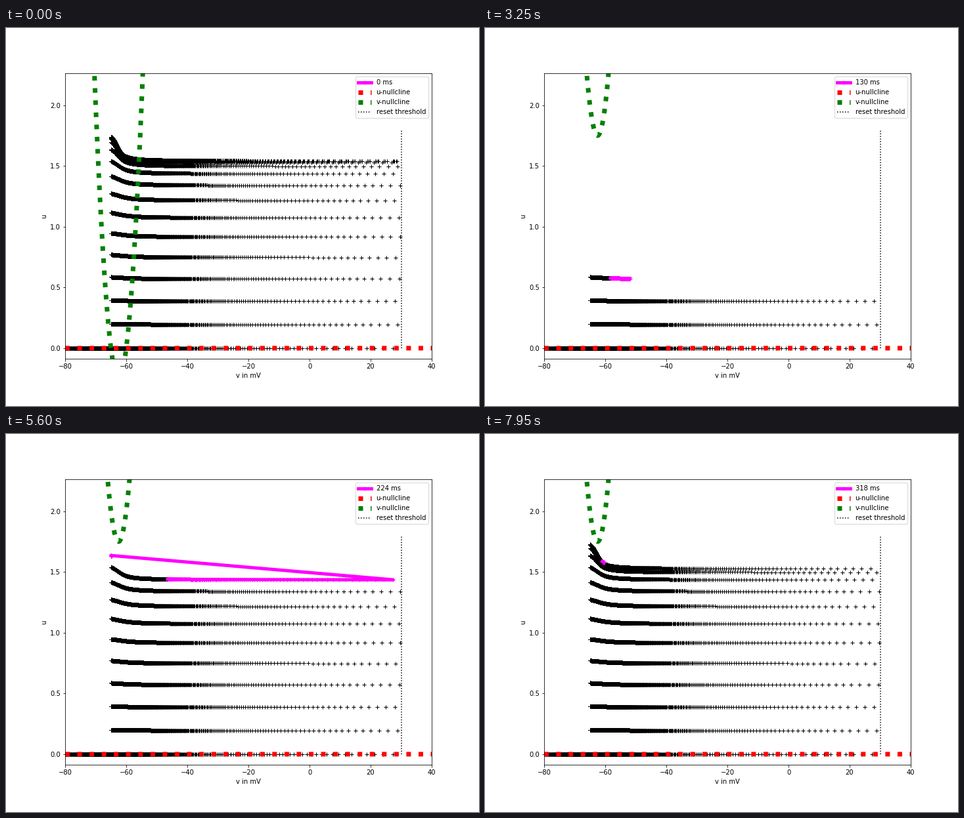
These frames come from a looping animation (720 by 576 pixels, 8000 ms). A matplotlib script:

```python
import numpy as np
import matplotlib.pyplot as plt
from matplotlib.animation import FuncAnimation

plt.rcParams.update({"figure.subplot.bottom": 0.125, "font.size": 10})

# Quadratic integrate-and-fire neuron with a slow recovery variable
DT = 0.01            # ms per integration step
T_END = 500          # ms
T_STEP = 100         # ms, onset of the stronger input
A, C, D = 0.003, -65.0, 0.2
THRESHOLD = 30.0
FRAMES, INTERVAL = 160, 50
STRIDE = 200         # integration steps per frame (2 ms)


def current(t):
    return 16.0 if t < T_STEP else 18.0


def v_nullcline(v, i_ext):
    return 0.04 * v ** 2 + 5 * v + 140 + i_ext


def simulate():
    n = int(T_END / DT)
    v, u = np.empty(n), np.empty(n)
    x, y = -80.0, 0.0
    for k in range(n):
        v[k], u[k] = x, y
        x, y = x + DT * (v_nullcline(x, current(k * DT)) - y), y - DT * A * y
        if x >= THRESHOLD:
            x, y = C, y + D
    return v, u


v, u = simulate()
u_max = u.max()
grid = np.linspace(-80, 40, 1201)

fig, ax = plt.subplots(figsize=(10, 8), dpi=72, facecolor="white")
past, = ax.plot([], [], "k+")
recent, = ax.plot([], [], "-+", color="magenta", lw=5, label="0 ms")
ax.plot(grid, 0 * grid, "r:", lw=7, label="u-nullcline")
v_null, = ax.plot(grid, v_nullcline(grid, current(0)), ":", color="green", lw=7,
                  label="v-nullcline")
ax.plot([THRESHOLD, THRESHOLD], [0, 1.8], "k:", label="reset threshold")
ax.set_xlim(-80, 40)
ax.set_ylim(-0.05 * u_max, 1.3 * u_max)
ax.set_xlabel("v in mV")
ax.set_ylabel("u")
clock = ax.legend(loc="upper right").get_texts()[0]


def update(frame):
    end = frame * STRIDE
    old = slice(0, end - STRIDE)       # negative stop: the first frame shows the full run
    new = slice(end - STRIDE, end)
    past.set_data(v[old], u[old])
    recent.set_data(v[new], u[new])
    t = end * DT
    v_null.set_ydata(v_nullcline(grid, current(t)))
    clock.set_text(f"{t:.0f} ms")
    return past, recent, v_null, clock


anim = FuncAnimation(fig, update, frames=FRAMES, interval=INTERVAL, repeat=True,
                     repeat_delay=0)
plt.show()
```
